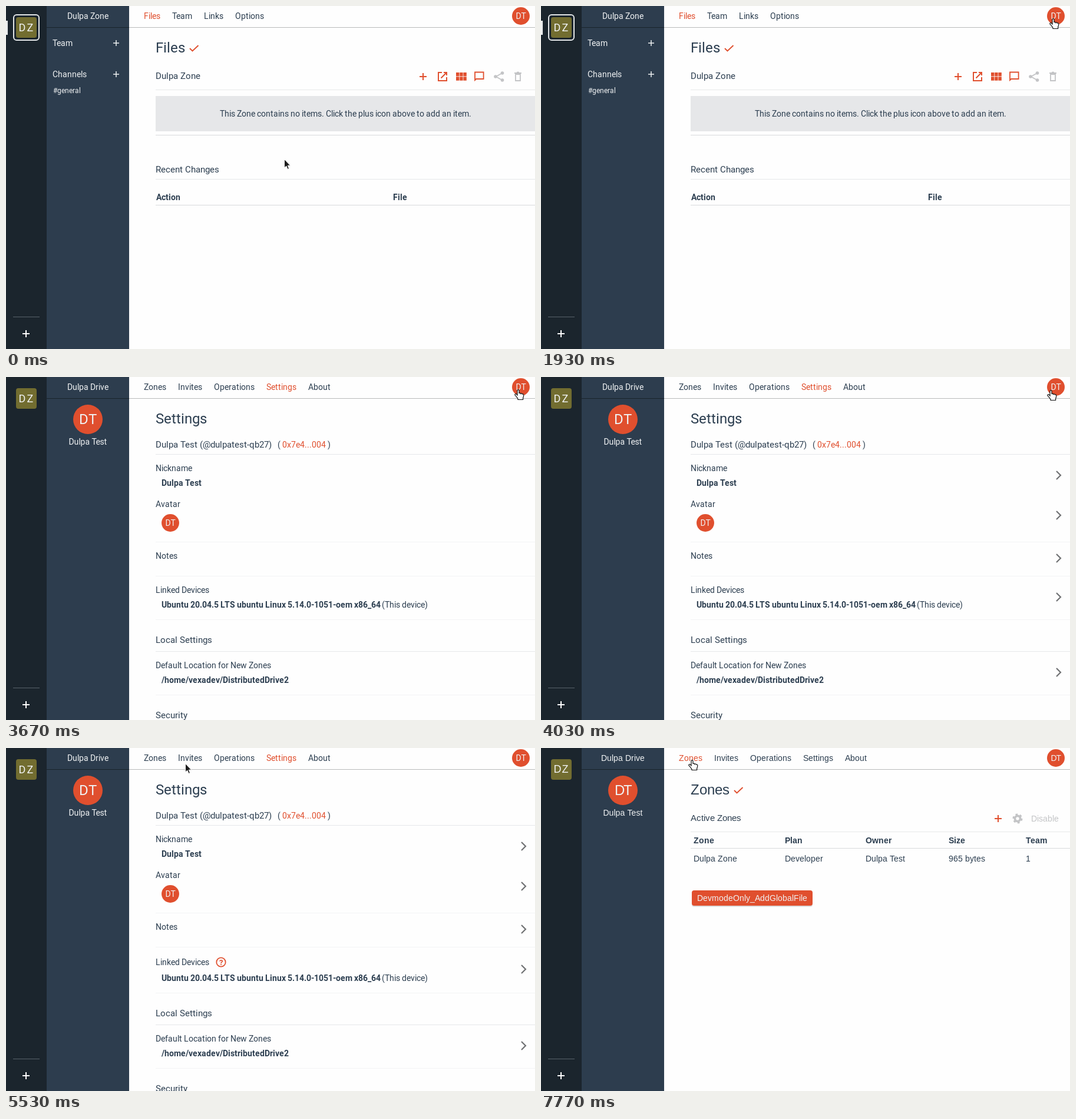
Recreate the animation shown at these times as an HTML page. Size 898 by 583 pixels, loop 8000 ms.

```html
<!DOCTYPE html>
<html lang="en">
<head>
<meta charset="utf-8">
<title>Zone settings</title>
<style>
  html, body { margin: 0; width: 100%; height: 100%; overflow: hidden; background: #fefefe; }
  .page, svg { position: absolute; left: 0; top: 0; width: 898px; height: 583px; overflow: hidden; }
  p { position: absolute; margin: 0; line-height: 20px; white-space: pre; font-kerning: none; }
  .mid { width: 200px; text-align: center; }
</style>
</head>
<body>
<script>
const INK = '#2c3e50', RED = '#e04f2e', PALE = '#f0f2f3', GREY = '#c3c4c6';
const ROBOTO = 'Roboto, sans-serif', ARIAL = '"Liberation Sans", Arial, sans-serif';

// Text placed by its baseline
function text(x, y, s, { size = 14, color = INK, bold, mid, gap = 0, id } = {}) {
  const up = Math.round(.9277 * size), down = Math.round(.2441 * size);
  const top = y - up - Math.floor((20 - up - down) / 2);
  return `<p ${id ? `id="${id}"` : ''} class="${mid ? 'mid' : ''}" data-gap="${gap}" style="left:${mid ? x - 100 : x}px;` +
    `top:${top}px;font-size:${size}px;color:${color};font-weight:${bold ? 700 : 400}">${s}</p>`;
}

// Rounds every glyph advance and kerning pair to whole pixels, as hinted text does
const pen = document.createElement('canvas').getContext('2d');
const width = s => pen.measureText(s).width;
function snap(p) {
  const { fontWeight, fontSize, fontFamily } = getComputedStyle(p);
  pen.font = `${fontWeight} ${fontSize} ${fontFamily}`;
  const chars = [...p.textContent];
  p.innerHTML = chars.map((c, i) => {
    const next = chars[i + 1] || '', w = width(c);
    const kern = next && Math.round(width(c + next) - w - width(next));
    // the small bias keeps the browser from rounding the span up
    const space = Math.round(w) + Number(kern) + Number(p.dataset.gap) - w - .005;
    return `<span style="letter-spacing:${space.toFixed(4)}px">${c}</span>`;
  }).join('');
}

const rect = (x, y, w, h, fill, r = 0) => `<rect x="${x}" y="${y}" width="${w}" height="${h}" rx="${r}" fill="${fill}"/>`;
const disc = (x, y, r, fill = RED) => `<circle cx="${x}" cy="${y}" r="${r}" fill="${fill}"/>`;
const line = (d, color = RED, w = 2) => `<path d="${d}" fill="none" stroke="${color}" stroke-width="${w}"/>`;
const plus = (x, y, color = RED, r = 6, w = 2) => line(`M${x - r} ${y}h${2 * r}M${x} ${y - r}v${2 * r}`, color, w);
const tick = x => line(`M${x} 72l4.5 4.5 10-9.5`, RED, 1.9);
const rule = (y, color = '#e6e8ea') => rect(254, y, 644, 1, color);

function page(font, nav, active, team, shapes, words) {
  const arial = font === ARIAL;
  const el = document.createElement('div');
  el.className = 'page';
  el.style.fontFamily = font;
  el.innerHTML = '<svg>' +
    rect(0, 0, 898, 583, '#fefefe') + rect(0, 0, 69, 583, '#1b252d') + rect(69, 0, 140, 583, '#2d3d4e') +
    rect(69, 36, 140, 1, '#19232b') + rect(209, 36, 689, 1, '#b9babb') +
    rect(17, 19, 35, 35, '#726d30', 4) + rect(12, 528, 45, 1, '#59636b') +
    plus(34, 557, '#fff') + disc(874, 17, 15) + shapes + '</svg>' +
    text(arial ? 34.5 : 35, arial ? 42 : 43, 'DZ', { size: 18, color: PALE, mid: 1, gap: arial ? 1 : 2 }) +
    text(139, 22, team, { color: PALE, mid: 1 }) +
    text(874, 22, 'DT', { color: PALE, mid: 1, gap: arial ? -1 : 0 }) +
    nav.map(([x, s]) => text(x, 22, s, { color: s === active ? RED : INK, id: s === 'Zones' && !arial ? 'zones' : '' })).join('') +
    words;
  document.body.append(el);
  el.querySelectorAll('p').forEach(snap);
  return el;
}

function homePage() {
  const icons =
    plus(708, 120) +
    line('M740 113h-6v14h14v-6M743 113h5v5M748 113l-9.5 9.5') +
    [0, 1, 2, 3, 4, 5].map(i => rect(764 + i % 3 * 6.2, i < 3 ? 113 : 120.3, 5.4, 6.4, RED)).join('') +
    line('M796 126V112.5h14.6V124h-12.6z', RED, 1.8) +
    line('M842.5 114l-11 6 11 6', GREY, 1.8) +
    disc(842.5, 114, 2.8, GREY) + disc(831, 120, 2.8, GREY) + disc(842.5, 126, 2.8, GREY) +
    line('M865 116v11h8v-11zM863 114h12M867 112.7h4', GREY, 1.8);
  return page(ROBOTO, [[234, 'Files'], [282, 'Team'], [336, 'Links'], [389, 'Options']], 'Files', 'Dulpa Zone',
    rect(0, 25, 3, 24, '#e8eaeb') +
    '<rect x="13" y="15" width="43" height="43" rx="5" fill="none" stroke="#e3e6e8" stroke-width="2"/>' +
    plus(187, 63, PALE, 5, 1.5) + plus(187, 116, PALE, 5, 1.5) + tick(312) + icons +
    rule(142) + rect(254, 153, 644, 60, '#e6e7e9') + rule(219, '#d8dadc') + rule(294) + rule(338, '#d8dadc'),
    text(79, 68, 'Team', { color: PALE }) + text(79, 121, 'Channels', { color: PALE }) +
    text(80, 148, '#general', { size: 12, color: PALE }) +
    text(254, 79, 'Files', { size: 24 }) + text(254, 124, 'Dulpa Zone', { size: 15 }) +
    text(363, 188, 'This Zone contains no items. Click the plus icon above to add an item.') +
    text(254, 283, 'Recent Changes', { size: 15 }) +
    text(255, 330, 'Action', { bold: 1 }) + text(657, 330, 'File', { bold: 1 }));
}

const navFor = font => (font === ARIAL ? [234, 294, 355, 445, 516] : [234, 292, 353, 442, 513])
  .map((x, i) => [x, ['Zones', 'Invites', 'Operations', 'Settings', 'About'][i]]);

const profile = font =>
  text(139, 80, 'DT', { size: 24, color: PALE, mid: 1, gap: font === ARIAL ? -2 : 0 }) +
  text(139, 115, 'Dulpa Test', { color: PALE, mid: 1 });

function settingsPage(font, chevrons, help) {
  const d = font === ROBOTO ? 1 : 0, h = help ? 4 : 0, low = 2 * d + h;
  const faint = '#f3f4f5';
  const marks = chevrons
    ? [167, 235, 308, 374 + h / 2, 502 + h].map(y => line(`M875 ${y - 7}l7 7-7 7`, '#707274', 2.2)).join('') : '';
  const circle = help ? '<circle cx="365" cy="364" r="7.7" fill="none" stroke="' + RED + '" stroke-width="1.8"/>' : '';
  return page(font, navFor(font), 'Settings', 'Dulpa Drive',
    disc(139, 72, 25) + disc(279, 247 + d, 15) + marks + circle +
    rule(130 + d) + rule(279 + d, faint) + rule(337 + d, faint) + rule(411 + d + h, faint) +
    rule(464 + low) + rule(538 + low, faint),
    profile(font) +
    text(254, 79, 'Settings', { size: 24 }) +
    text(254, 120, 'Dulpa Test (@dulpatest-qb27)', { size: 15 }) +
    text(d ? 461 : 460, 120, '(') + text(469, 120, '0x7e4...004', { color: RED }) + text(d ? 546 : 548, 120, ')') +
    text(254, 159 + d, 'Nickname') + text(264, 184 + d, 'Dulpa Test', { bold: 1 }) +
    text(254, 220 + d, 'Avatar') +
    text(279, 252 + d, 'DT', { color: PALE, mid: 1, gap: d - 1 }) +
    text(254, 308 + d, 'Notes') +
    text(254, 366 + d + h / 2, 'Linked Devices') +
    (help ? text(365, 369, '?', { size: 13, color: RED, bold: 1, mid: 1 }) : '') +
    text(264, 391 + d + h, 'Ubuntu 20.04.5 LTS ubuntu Linux 5.14.0-1051-oem x86_64', { bold: 1 }) +
    text(d ? 638 : 665, 391 + d + h, '(This device)') +
    text(254, 451 + d + h, 'Local Settings', { size: 15 }) +
    text(254, 493 + low, 'Default Location for New Zones') +
    text(264, 518 + low, '/home/vexadev/DistributedDrive2', { bold: 1 }) +
    text(254, 578 + low, 'Security', { size: 15 }));
}

function zonesPage() {
  const cols = [[259, 'Zone', 'Dulpa Zone'], [414, 'Plan', 'Developer'], [551, 'Owner', 'Dulpa Test'],
    [692, 'Size', '965 bytes'], [823, 'Team', '1']];
  const ring = (r, w, dash) => `<circle cx="809" cy="120" r="${r}" fill="none" stroke="${GREY}" stroke-width="${w}" stroke-dasharray="${dash}"/>`;
  return page(ARIAL, navFor(ARIAL), 'Zones', 'Dulpa Drive',
    disc(139, 72, 25) + tick(328) + plus(776, 120) + ring(4.6, 3.8, 'none') + ring(7, 3, 3.665) +
    rule(142) + rule(170, '#d8dadc') +
    rect(256, 244, 205, 26, '#0002', 4) + rect(256, 242, 205, 26, RED, 4),
    profile(ARIAL) +
    text(254, 79, 'Zones', { size: 24 }) + text(254, 124, 'Active Zones', { size: 15 }) +
    text(832, 125, 'Disable', { color: GREY }) +
    cols.map(([x, head, cell]) => text(x, 162, head, { bold: 1 }) + text(x, 193, cell)).join('') +
    text(265, 260, 'DevmodeOnly_AddGlobalFile', { color: PALE }));
}

const scenes = [
  [0, homePage()],
  [3270, settingsPage(ARIAL)],
  [3670, settingsPage(ROBOTO)],
  [3830, settingsPage(ROBOTO, true)],
  [4070, settingsPage(ROBOTO, true, true)],
  [7770, zonesPage()]
];
const zonesLink = scenes[4][1].querySelector('#zones');

document.body.insertAdjacentHTML('beforeend', `<svg><g id="cursor">
  <path id="arrow" d="M-.5.5V15l3.3-3 2.3 5.4 2.4-1-2.2-5.2h4.4z" fill="#1c1c1c" stroke="#fff"/>
  <path id="hand" d="M-2 2.4C-2 0 1 0 1 2.4V7c.2-1 2.6-.9 2.8.4.5-.8 2.4-.5 2.6.7.7-.6 2.4-.2 2.4 1.4 0 3-.3 3.4-1.2 5.2v2.8H-1V16C-2.5 13.5-5 11-6 9.6-6.8 8.2-4.8 7-3.6 8.2L-2 10z"
    fill="#fff" stroke="#111" stroke-width="1.2"/>
</g></svg>`);
const cursor = document.getElementById('cursor');
const [arrow, hand] = cursor.children;

// Pointer path: time, x, y
const path = [[0, 473, 260], [530, 473, 260], [800, 224, 185], [1330, 818, 47], [1430, 818, 47], [1930, 870, 21],
  [3990, 870, 21], [4030, 866, 22], [4210, 866, 22], [4330, 858, 26], [4450, 858, 26], [4870, 640, 31],
  [5270, 387, 30], [5310, 387, 30], [5530, 305, 26], [5930, 250, 26], [6110, 250, 26], [6250, 257, 20], [8000, 257, 20]];

const ease = u => u * u * (3 - 2 * u);

function pointer(t) {
  const i = path.findIndex(k => k[0] > t);
  const [t0, x0, y0] = path[i - 1], [t1, x1, y1] = path[i];
  const e = ease((t - t0) / (t1 - t0));
  return [x0 + (x1 - x0) * e, y0 + (y1 - y0) * e];
}

function mix(u) {
  const from = [44, 62, 80], to = [224, 79, 46];
  return `rgb(${from.map((c, i) => Math.round(c + (to[i] - c) * u))})`;
}

function draw(now) {
  const t = now % 8000;
  const shown = scenes.filter(s => s[0] <= t).pop();
  for (const s of scenes) s[1].style.display = s === shown ? '' : 'none';
  zonesLink.style.color = mix(ease(Math.min(1, Math.max(0, (t - 6130) / 400))));
  const [x, y] = pointer(t).map(Math.round);
  cursor.setAttribute('transform', `translate(${x} ${y})`);
  const link = t >= 1700 && t < 4230 || t >= 6130;
  arrow.style.display = link ? 'none' : '';
  hand.style.display = link ? '' : 'none';
}

const start = performance.now();
function loop() {
  draw(performance.now() - start);
  requestAnimationFrame(loop);
}
loop();
</script>
</body>
</html>
```
